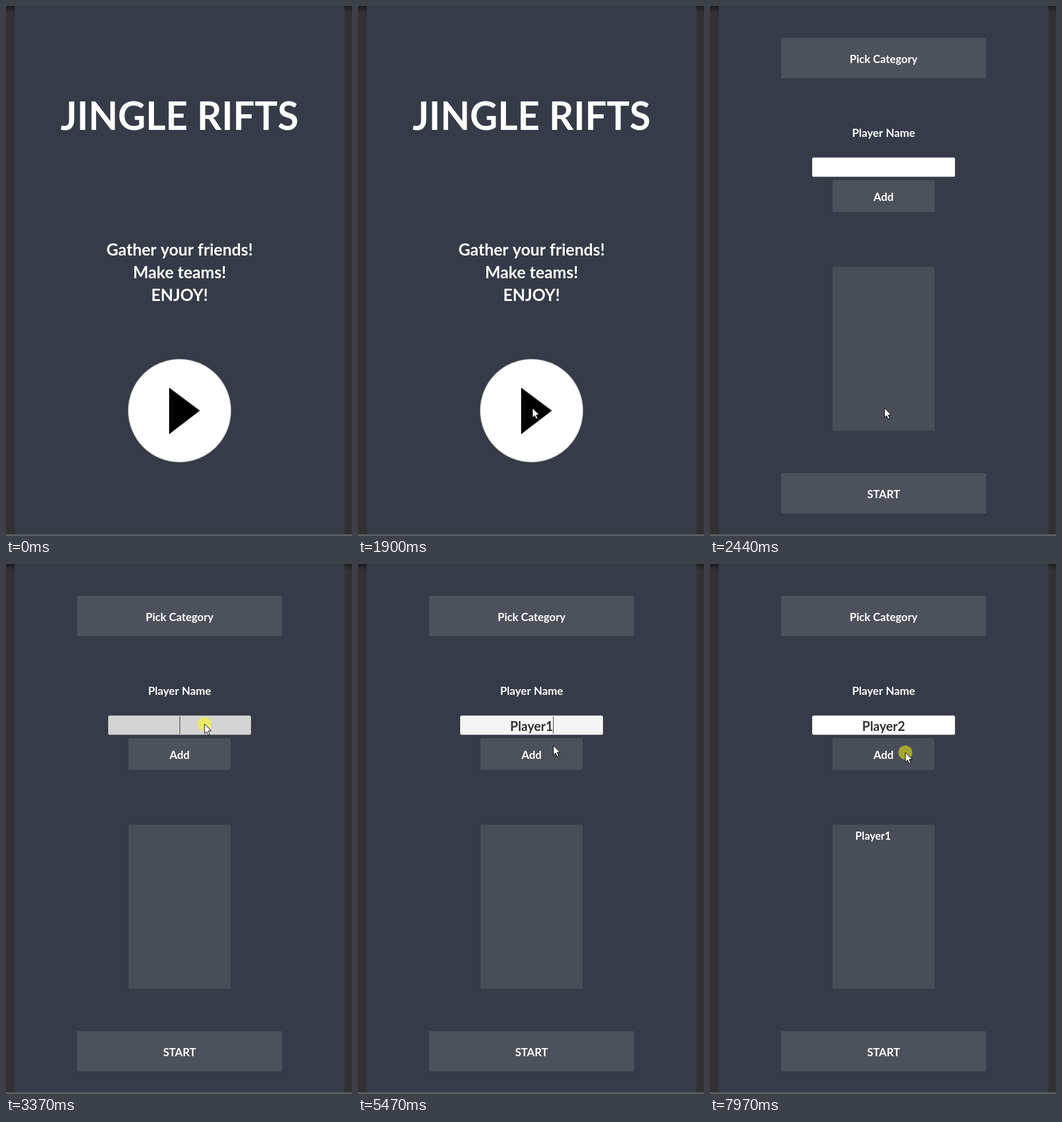
An HTML page with a canvas for the animation above (8 s loop, 596 px wide and 911 px high).

```html
<!DOCTYPE html>
<html lang="en">
<head>
<meta charset="utf-8">
<title>Jingle Rifts</title>
<style>
html, body { margin: 0; width: 596px; height: 911px; overflow: hidden; background: #353b47; }
canvas { display: block; }
</style>
</head>
<body>
<canvas id="stage" width="596" height="911"></canvas>
<script>
const ctx = document.getElementById('stage').getContext('2d');
const LOOP = 8000, MID = 299;
const TICK = 80, KEY_INTERVAL = 135, CARET_ON = 590;

// When things happen, in ms
const playPress = 2280, setupShown = 2440;
const focus1 = 3370, typing1 = 4310, addPress1 = 5550, added1 = 5630;
const focus2 = 5950, typing2 = 6660, addPress2 = 7970;
const presses = [playPress, focus1, addPress1, focus2, addPress2];

// Pointer stops
const stops = [
  { from: 220, to: 980, x: 300.5, y: 691 },
  { from: 2910, to: 3230, x: 342, y: 275 },
  { from: 3450, to: 3690, x: 350, y: 255 },
  { from: 5180, to: 5470, x: 336.5, y: 312 },
  { from: 5710, to: 6110, x: 357.5, y: 262 },
  { from: 7740, to: 7970, x: 336.5, y: 324 }
];

const clamp = v => Math.max(0, Math.min(1, v));
const between = (t, a, b) => t >= a && t < b;

// A pressed control darkens and recovers; 1 is untouched
const pressTint = (t, ...times) =>
  Math.min(...times.map(p => 1 - 0.215 * clamp(1 - Math.abs(t - p - 60) / 160)));

function pointerAt(t) {
  let x = 550, y = 935;
  for (const stop of stops) {
    if (t < stop.from) break;
    const elapsed = (Math.floor((t - stop.from) / TICK) + 1) * TICK;
    const u = 1 - (1 - clamp(elapsed / (stop.to - stop.from))) ** 1.6;
    x += (stop.x - x) * u;
    y += (stop.y - y) * u;
  }
  return [x, y];
}

function rect(x, y, w, h, color, radius = 0) {
  ctx.fillStyle = color;
  ctx.beginPath();
  ctx.roundRect(x, y, w, h, radius);
  ctx.fill();
}

function disc(x, y, r, color) {
  ctx.fillStyle = color;
  ctx.beginPath();
  ctx.arc(x, y, r, 0, 2 * Math.PI);
  ctx.fill();
}

function polygon(points, color) {
  ctx.fillStyle = color;
  ctx.beginPath();
  points.forEach(p => ctx.lineTo(...p));
  ctx.closePath();
  ctx.fill();
}

function label(text, baseline, size, color = '#fff', x = MID) {
  ctx.font = `bold ${size}px Lato, sans-serif`;
  ctx.textAlign = 'center';
  ctx.fillStyle = color;
  ctx.fillText(text, x, baseline);
  return ctx.measureText(text).width;
}

function gray(level) {
  const v = Math.round(255 * level);
  return `rgb(${v},${v},${v})`;
}

// Centred translucent panel with an optional caption
function panel(y, w, h, caption = '', alpha = 0.114) {
  rect(MID - w / 2, y, w, h, `rgba(255,255,255,${alpha})`, 2.5);
  label(caption, y + h / 2 + 8.5, 18.9);
}

function drawBackground() {
  rect(0, 0, 596, 911, '#313131');
  const shade = ctx.createLinearGradient(0, 0, 0, 10);
  shade.addColorStop(0, '#1c1c1c');
  shade.addColorStop(1, '#313131');
  rect(0, 0, 596, 10, shade);
  rect(15, 0, 568, 909, '#353b47');
  rect(0, 908, 596, 3, '#5c5f65');
}

function drawStartScreen(t) {
  label('JINGLE RIFTS', 212.5, 66);
  ['Gather your friends!', 'Make teams!', 'ENJOY!'].forEach((line, i) =>
    label(line, 428.5 + 39 * i, 28.2));
  disc(MID, 695.5, 89, '#a9acb1');
  disc(MID, 695.5, 88, gray(pressTint(t, playPress)));
  polygon([[281, 656], [334, 695.5], [281, 736]], '#000');
}

function drawInput(t) {
  const focused = between(t, focus1, addPress1) || between(t, focus2, addPress2);
  const base = focused ? 0.96 : 1;
  rect(176, 260.5, 246, 33, gray(base * pressTint(t, focus1, focus2)), 2.5);

  const [word, start] = t < added1 ? ['Player1', typing1] : ['Player2', typing2];
  const count = Math.max(0, Math.min(word.length, Math.floor((t - start) / KEY_INTERVAL) + 1));
  const width = label(word.slice(0, count), 287, 22, '#323232');

  const lastInput = count ? start + (count - 1) * KEY_INTERVAL : t < added1 ? focus1 : focus2;
  if (focused && t < lastInput + CARET_ON) {
    rect(Math.round(MID + width / 2), 262, 1, 30, '#323232');
  }
}

function drawSetupScreen(t) {
  panel(54.5, 353, 69.5, 'Pick Category');
  label('Player Name', 225, 19.2);
  drawInput(t);
  panel(299.5, 176, 54.5, 'Add', 0.114 * pressTint(t, addPress1, addPress2));
  panel(448, 176, 282, '', 0.094);
  if (t >= added1) label('Player1', 473.5, 18.3, '#fff', 281);
  panel(803, 353, 69, 'START');
}

function drawPointer(t) {
  const [x, y] = pointerAt(t);
  if (presses.some(p => between(t, p, p + 2 * TICK))) disc(x, y, 12, 'rgba(255,255,0,.5)');
  ctx.save();
  ctx.translate(x, y);
  polygon([[0, 0], [0, 16.5], [3.8, 13], [6.4, 18.8], [9, 17.7], [6.6, 12], [11.5, 11.6]], '#fff');
  ctx.strokeStyle = '#000';
  ctx.stroke();
  ctx.restore();
}

function render() {
  const t = performance.now() % LOOP;
  drawBackground();
  (t < setupShown ? drawStartScreen : drawSetupScreen)(t);
  drawPointer(t);
  requestAnimationFrame(render);
}
render();
</script>
</body>
</html>
```
